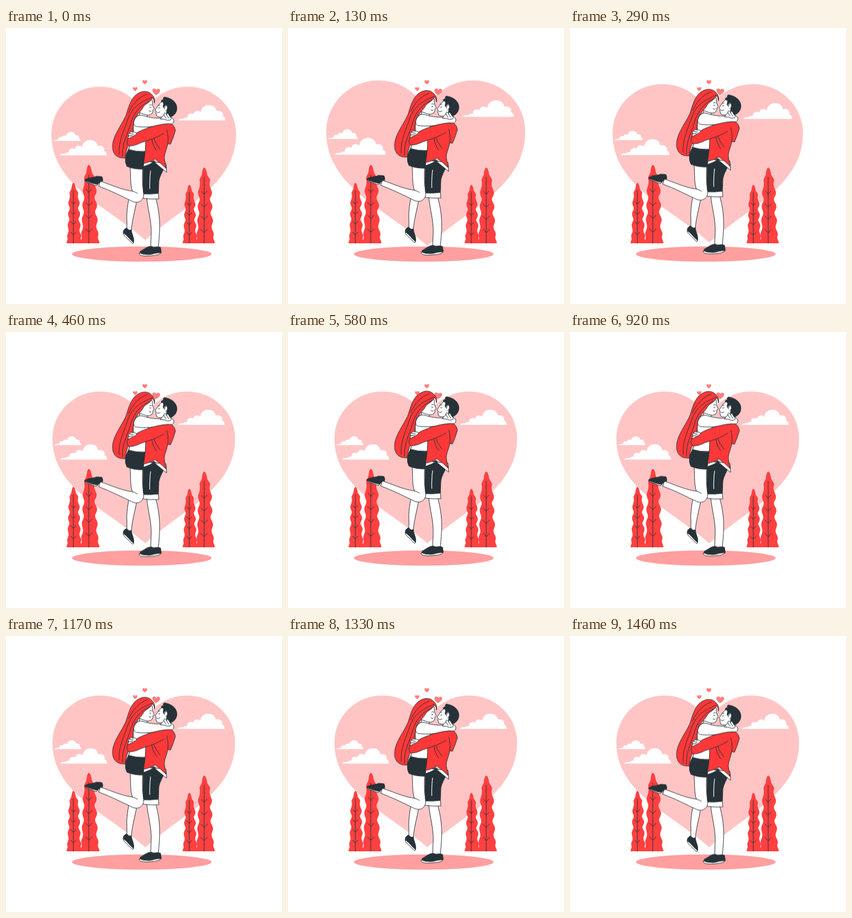
An HTML page without scripts that plays this animation: 500x500 px, repeating every 1500 ms.

```html
<!DOCTYPE html>
<html lang="en">
<head>
<meta charset="utf-8">
<title>Hugging couple</title>
<style>
  html, body { margin: 0; width: 100%; height: 100%; overflow: hidden; background: #fff; }
  svg { display: block; width: 100vw; height: 100vh; }
  .beat, .float { animation: beat 1.5s linear -18ms infinite; }
  .beat { transform-origin: 250px 250px; }
  .float { animation-name: float; }
  @keyframes beat {
    0%, 30%, 40%, 60%, 100% { transform: scale(1); }
    10%, 49% { transform: scale(1.09); }
  }
  @keyframes float {
    0%, 100% { transform: translateY(.8px); }
    50% { transform: translateY(-9.2px); }
  }
  .pale { fill: #ffc5c5; }
  .soft { fill: #ff9f9f; }
  .mini { fill: #ff7f7f; }
  .red { fill: #ff4040; }
  .float .red { fill: #fd3838; }
  .white { fill: #fff; }
  .dark { fill: #263238; }
  .line { fill: none; }
  .ink, .line { stroke: #263238; stroke-width: 1; stroke-linecap: round; stroke-linejoin: round; }
  .line { vector-effect: non-scaling-stroke; }
</style>
</head>
<body>
<svg viewBox="0 0 500 500">
  <defs>
    <path id="cloud" d="M0 0Q3-4 10-3Q12-6 17-5C16-12 24-14 28-11C29-18 36-19 41-15C42-31 67-32 69-17C77-19 83-13 80-8Q85-7 85 0z"/>
    <path id="heart" d="M0 6C-3 3-7 1-7-3C-7-7-2-7.5 0-4C2-7.5 7-7 7-3C7 1 3 3 0 6z"/>
    <path id="half" d="M.5-142C-3-142-4-136-5-130S-11-122-10-117S-9-109-11-103S-14-97-13-92S-9-86-10-81S-15-73-14-67S-10-60-11-55S-16-47-15-41S-12-33-13-28S-18-20-16-14S-19-4-18 0H.5z"/>
    <g id="tree">
      <use href="#half" transform="scale(.84 1)"/>
      <use href="#half" transform="scale(-1.08 1)"/>
      <path class="line" d="M0-124V0M-5-98L0-92L5-98M-6-74L0-68L6-74M-6-51L0-45L6-51M-6-26L0-20L6-26"/>
    </g>
  </defs>

  <g class="beat">
    <path class="pale" d="M252.500 383C185 322 84 285 84 193A87 85 0 0 1 249.500 156A87 85 0 0 1 415 193C415 285 318 322 252.500 383z"/>
    <g class="white">
      <use href="#cloud" x="311" y="168.300"/>
      <use href="#cloud" x="98" y="231"/>
      <use href="#cloud" transform="translate(87 205) scale(.58)"/>
    </g>
  </g>

  <g class="mini">
    <use href="#heart" transform="translate(251.5 98.5) scale(.62)"/>
    <use href="#heart" transform="translate(234 111) scale(.58)"/>
    <use href="#heart" transform="translate(272 116) rotate(4)"/>
  </g>

  <ellipse class="soft" cx="246" cy="409.5" rx="126.5" ry="13.7"/>
  <g class="red">
    <use href="#tree" transform="translate(150 390) scale(.98 1)"/>
    <use href="#tree" transform="translate(122 390) scale(.8 .77)"/>
    <use href="#tree" transform="translate(359 390) scale(.98 .965)"/>
    <use href="#tree" transform="translate(332 390) scale(.78 .745)"/>
  </g>

  <g class="float">
    <!-- his legs and shoes -->
    <path class="ink white" d="M255 307C257 330 264 350 263 372L262 398H276C278 370 282 345 271 307z"/>
    <path class="ink dark" d="M243 404C250 401 256 394 264 395C268 398 274 394 280 397L281 405L262 408z"/>
    <path class="ink white" d="M241 408C241 413 254 413 264 412C273 411 281 410 281 405L280 402L246 404z"/>
    <path class="ink dark" d="M242 407C246 402 256 401 262 395C266 400 273 399 279 398C281 401 281 404 281 407C270 406 266 410 258 410Q248 410 242 407z"/>
    <path class="ink dark" d="M249 247L248 300H276L277 276C279 267 283 261 286 254L268 240z"/>
    <path class="ink white" d="M248 300Q262 301 276 299L277 309Q262 310 249 308z"/>
    <path d="M262 258Q260 272 260.500 291" fill="none" stroke="#fff" stroke-width="1.2"/>

    <!-- her legs and shoes -->
    <path class="ink white" d="M224 300C221 318 218 332 219 348L219 364L227 367C228 350 233 333 237 312z"/>
    <path class="ink white" d="M213 366Q211 372 214 375L229 390Q232 390 231 386L218 365z"/>
    <path class="ink dark" d="M214 365Q217 361 219 362Q222 367 227 365C228 374 233 380 231 388C224 383 220 375 213 371z"/>
    <path class="ink white" d="M225 252C226 270 225 284 229 295C207 292 190 283 171 277L168 286C190 294 211 305 230 314C241 318 249 311 249.500 302C247.500 286 246 270 248 252z"/>
    <path class="line" d="M229 295Q234 296 238 299"/>
    <path class="ink white" d="M143 274Q141 276 145 278L162 285Q166 285 167 282z"/>
    <path class="ink dark" d="M143 274.500C148 270 158 271 164 268Q170 268 174 269Q176 273 175 277C169 277 170 281 165 282.500C157 282 150 278 143 276z"/>

    <!-- her torso and shorts -->
    <path class="ink white" d="M238 158C231 165 230 176 231 188C228 200 224 210 222 222L253 226L258 180L252 160z"/>
    <path class="ink dark" d="M222 219.500Q236 224 252 223L250 255Q232 256 219 250Q212 236 222 219.500z"/>

    <!-- his shirt and jacket -->
    <path class="ink white" d="M250 241L249 250.500Q260 247 268 242Q279 251 291 261L290 245z"/>
    <path class="ink red" d="M262 179C276 172 292 172 300 173Q306 178 307 185Q303 199 298 210L293 209C291 221 286 228 287 237L290 254Q280 244 270 236.500Q260 243 249 245C252 230 253 216 253 202z"/>
    <path class="line" d="M293 209Q295 196 291 183M264 200Q266 213 273 222M267 198Q271 209 279 219"/>

    <!-- her head -->
    <path class="ink white" d="M242 146V162H255L256 157z"/>
    <path class="ink white" d="M240 131Q252 121 265 130Q265 138 266 140L268.500 146L266 148Q267 152 264 155Q259 159 251 156L240 152z"/>
    <path class="ink red" d="M269 135C270 129 269 125 265 121C260 114 250 112 241 117C228 123 223 139 218 156C211 174 193 194 193 214C193 228 201 236 216 235C217 224 220 213 225 204C233 191 228 177 233 164C237 154 246 150 249 142C253 136 261 135 265 126Q269 129 269 135z"/>
    <path class="line" d="M265 125C246 132 229 142 221 164C216 181 203 204 205 228M262 131C245 138 232 151 226 172C220 194 210 207 211 232M256 119C240 124 229 138 222 153"/>
    <path class="line" d="M260 143Q261 144.500 263 143M260 139Q261.500 137.500 264 139M259 149.500Q261 151.500 263 150"/>

    <!-- his head -->
    <path class="ink white" d="M281 134Q276 138 274 142L270 148L272 150Q271 155 273 159Q278 162 286 160L285 170H298L300 150L292 132z"/>
    <path class="dark" d="M281 134Q280 129 285 129Q283 126 287 124C297 125 309 132 310 143C311 152 304 160 297 161L290 154L291 149Q294 140 290 139Q286 141 286 145Q283 143 285 137Q285 133 281 134z"/>
    <path class="ink white" d="M287 146Q288 138 292 141Q294 146 289 150"/>
    <path class="line" d="M276 144Q277 145.500 279 144M276 139.500L279 139M274 152.500Q277 153.500 279 151.500"/>

    <!-- her arm and hand -->
    <path class="ink white" d="M237 160C229 168 230 178 238 178C252 180 267 178 280 175Q291 172 299 174Q305 172 304 166Q301 161 297 160L283 163Q262 163 248 158Q241 156 237 160z"/>
    <path class="ink white" d="M280 164Q283 159 286 157Q286 152 289 154L291 157Q291 152 294 155L297 160Q301 163 298 166Q293 168 287 165z"/>
    <path class="line" d="M286 157L290 163M291 157L295 163"/>

    <!-- his arm and hand -->
    <path class="ink red" d="M300 173C281 172 258 179 241 187L221 199Q217 206 222 213Q231 214 245 207C260 202 274 198 286 190"/>
    <path class="ink white" d="M221 200Q221 196 223 195Q220 191 224 190Q225 186 229 188Q234 187 237 190Q235 194 231 195Z"/>
    <path class="line" d="M223 195L229 194M224 190L231 192"/>
  </g>
</svg>
</body>
</html>
```
